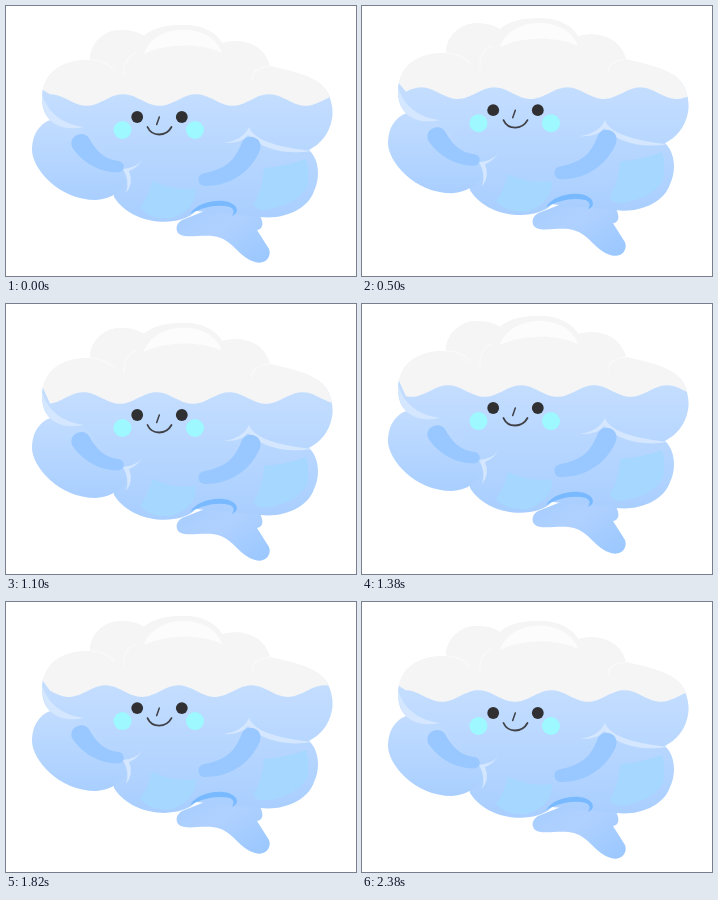
Animation, 350 px wide and 270 px high, one loop 2400 ms. Source, as an HTML page:

```html
<!DOCTYPE html>
<html lang="en">
<head>
<meta charset="utf-8">
<title>Floating brain</title>
<style>
html, body { margin: 0; width: 100%; height: 100%; overflow: hidden; background: #fff; }
svg { display: block; width: 350px; height: 270px; }
</style>
</head>
<body>
<svg viewBox="0 0 350 270" fill="none" stroke-linecap="round" stroke-linejoin="round">
  <defs>
    <linearGradient id="water" gradientUnits="userSpaceOnUse" x1="0" y1="82" x2="0" y2="217">
      <stop stop-color="#f5f5f5"/><stop stop-color="#c5deff"/><stop offset="1" stop-color="#a8ceff"/>
    </linearGradient>
    <linearGradient id="lobe" x1="0" y1="0" x2="0" y2="1">
      <stop stop-color="#c2dcff"/><stop offset="1" stop-color="#a9cfff"/>
    </linearGradient>
    <linearGradient id="stem" x1="0" y1="0" x2="1" y2="1">
      <stop stop-color="#a3ccff"/><stop offset=".45" stop-color="#b0d1ff"/><stop offset="1" stop-color="#99c7ff"/>
    </linearGradient>
    <clipPath id="head">
      <path id="outline" d="M44 114C37 107 36 99 36 90C37 70 52 53 84 54C84 37 98 24 115 24C124 24 132 26 138 30
        C146 22 161 19 178 19C196 19 210 26 216 37C236 32 258 38 264 60C286 65 306 70 316 79C325 88 328 103 326 113
        C323 129 314 138 303 144C314 154 314 173 308 185C302 203 278 214 254 211L190 205C174 222 126 220 108 191L100 130Z"/>
    </clipPath>
  </defs>
  <g id="brain">
    <path fill="url(#stem)" d="M176 214C171 217 169 222 172 227C179 234 198 227 212 231C227 235 234 252 249 256C259 259 266 251 263 243L251 224C257 223 258 217 254 210L224 195Z"/>
    <use href="#outline" fill="url(#water)"/>
    <path fill="url(#lobe)" d="M48 113C34 116 26 128 26 144C26 162 52 194 90 194C112 192 124 178 124 163C124 145 90 118 48 113Z"/>
    <path fill="url(#water)" d="M36 88C37 112 50 121 78 124L116 160L150 100Z"/>
    <g fill="#a5d7ff">
      <path d="M146 175Q167 185 190 182Q191 203 166 212Q144 214 134 202Q143 190 146 175Z"/>
      <path d="M258 162Q282 160 300 153Q304 165 301 181Q290 200 257 204Q248 202 248 197Q257 183 258 162Z"/>
    </g>
    <g fill="#d4e7ff">
      <path d="M36 88C42 107 56 118 78 121C52 126 35 115 36 88Z"/>
      <path d="M117 163Q130 162 136 154Q131 162 123 165Q128 177 120 187Q124 175 117 163Z"/>
      <path d="M218 137Q237 134 243 121Q249 139 306 145Q265 151 242 129Q235 138 218 137Z"/>
    </g>
    <path fill="#78b9ff" d="M184 208C192 194 222 190 230 201Q233 207 226 210Q230 204 224 201C211 198 197 201 184 208Z"/>
    <g fill="#98c8ff">
      <path d="M66 141C62 129 78 124 83 132C90 145 98 153 112 155A5.7 5.7 0 0 1 112 166.5C92 166 76 156 66 141Z"/>
      <path d="M236 136C241 126 258 131 254 144C246 164 226 180 199 180A6.4 6.4 0 0 1 197 167.5C220 163 229 155 236 136Z"/>
    </g>
    <path id="cap" fill="#f5f5f5" clip-path="url(#head)"/>
    <path fill="#fcfcfc" d="M138 48C148 16 206 16 216 47C196 37 160 37 138 48Z"/>
    <g stroke="#f9f9f9" stroke-width="1.5">
      <path d="M85 54Q98 54 108 64M130 47Q117 52 118 68"/>
      <path d="M264 60Q246 62 246 73"/>
    </g>
    <g fill="#9df8ff">
      <circle cx="116.5" cy="124" r="9"/><circle cx="189" cy="124" r="9"/>
    </g>
    <g fill="#303033">
      <circle cx="131.2" cy="111" r="5.9"/><circle cx="175.8" cy="111" r="5.9"/>
    </g>
    <g stroke="#404146">
      <path stroke-width="1.8" d="M141.5 121C146 131 160 131 165.5 121"/>
      <path stroke-width="1.5" d="M153.3 111L150.7 118.5"/>
    </g>
  </g>
</svg>
<script>
const LOOP = 2400, LIFT = 7, WAVELENGTH = 73, CREST = 44;
const brain = document.getElementById('brain');
const cap = document.getElementById('cap');

// Smooth step from 0 to 1 between two times
function ease(t, from, to) {
  const p = Math.min(1, Math.max(0, (t - from) / (to - from)));
  return p * p * (3 - 2 * p);
}

// White area above a wave whose crests are moved right by shift
function capPath(shift) {
  let d = 'M37 84';
  for (let x = 44; x <= 332; x += 2) {
    const y = 94 - 5.8 * Math.cos((x - CREST - shift) / WAVELENGTH * 2 * Math.PI);
    d += `L${x} ${y.toFixed(2)}`;
  }
  return d + 'L340 84V0H20V84Z';
}

function draw(now) {
  const t = now % LOOP;
  const height = ease(t, 200, 530) - ease(t, 790, 1100) + ease(t, 1100, 1390) - ease(t, 1690, 2050);
  brain.setAttribute('transform', `translate(0 ${-LIFT * height})`);
  cap.setAttribute('d', capPath(WAVELENGTH * t / LOOP));
  requestAnimationFrame(draw);
}
draw(0);
</script>
</body>
</html>
```
